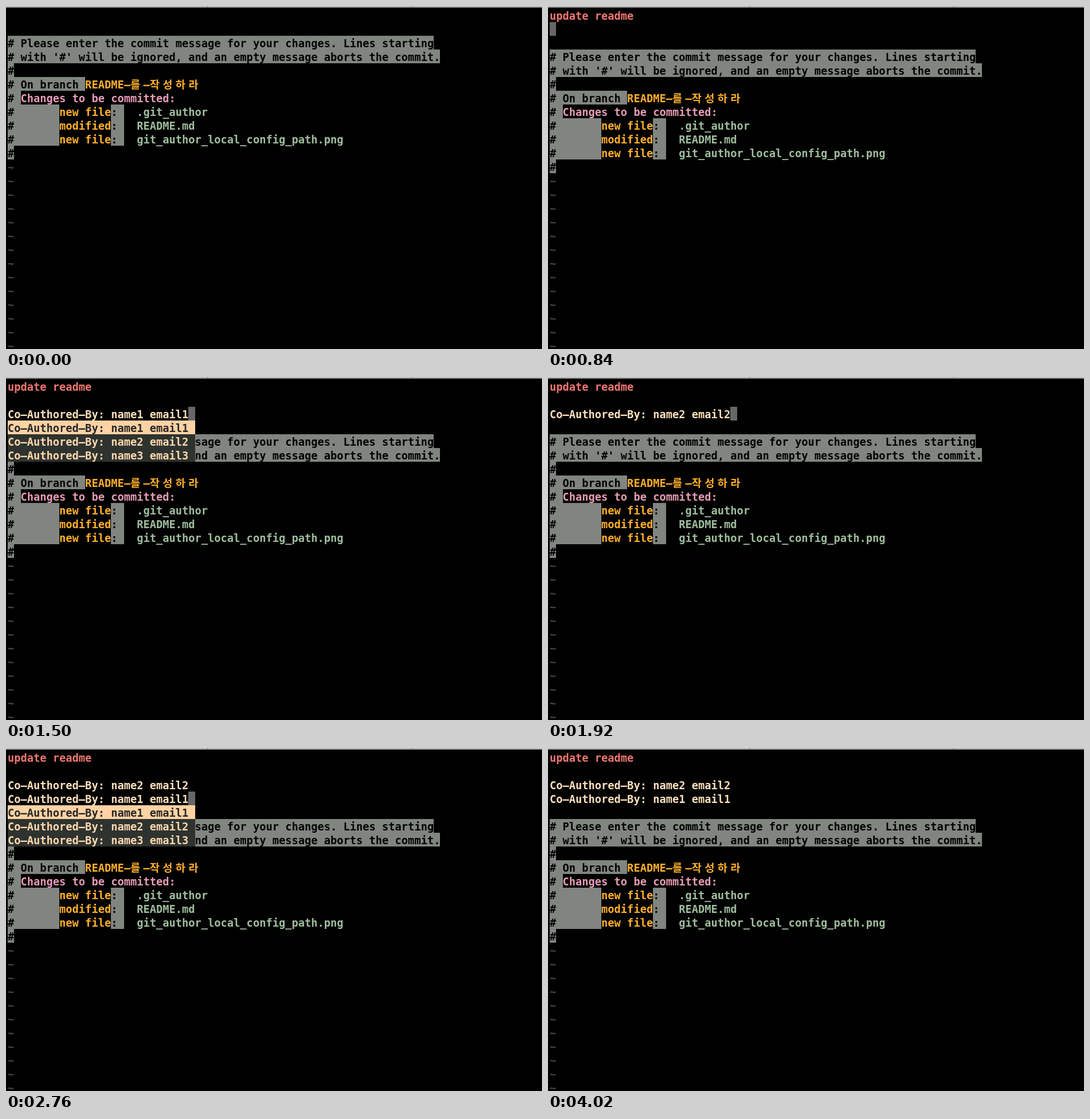
Animation of 935x599 px, one loop 4.08 s. Source, as an HTML page with a canvas:

```html
<!DOCTYPE html>
<html lang="en">
<head>
<meta charset="utf-8">
<title>Commit message editor</title>
<style>
html, body { margin: 0; width: 100%; height: 100%; overflow: hidden; background: #000; }
canvas { display: block; width: 935px; height: 599px; }
</style>
</head>
<body>
<canvas id="screen" width="935" height="599"></canvas>
<script>
const ctx = document.getElementById('screen').getContext('2d');
const LOOP = 4080, LEFT = 3, TOP = 4, CELL = 11.26, ROW = 24, ROWS = 25;
const FONT = 'bold 18.7px "DejaVu Sans Mono", "Noto Sans CJK KR", "Noto Sans CJK", monospace';
const C = {
  gray: '#808580', black: '#000', red: '#f0776f', cream: '#fbdfbc', yellow: '#ffaf2a',
  pink: '#e79bb8', green: '#9fbd9d', tilde: '#464a47', cursor: '#676767',
  menu: '#2e332f', menuText: '#ffd8ae', pick: '#ffd2a4', pickText: '#262626'
};

const TITLE = 'update readme';
const author = n => `Co–Authored–By: name${n} email${n}`;

// Each span: [column, text, color, background]
const note = text => [[0, text, C.black, C.gray]];
const file = (kind, name) => [
  [0, '#       ', C.black, C.gray], [8, kind, C.yellow],
  [16, ': ', C.black, C.gray], [20, name, C.green]
];
const COMMENTS = [
  note('# Please enter the commit message for your changes. Lines starting'),
  note("# with '#' will be ignored, and an empty message aborts the commit."),
  note('#'),
  [[0, '# On branch ', C.black, C.gray], [12, 'README–를–작성하라', C.yellow]],
  [[0, '# ', C.black, C.gray], [2, 'Changes to be committed:', C.pink]],
  file('new file', '.git_author'),
  file('modified', 'README.md'),
  file('new file', 'git_author_local_config_path.png'),
  note('#')
];

const isWide = ch => ch >= '가' && ch <= '힣';

function fillCells(row, col, count, color) {
  const x = Math.round(LEFT + col * CELL);
  ctx.fillStyle = color;
  ctx.fillRect(x, TOP + row * ROW, Math.round(LEFT + (col + count) * CELL) - x, ROW);
}

function drawText(row, [col, text, color, background]) {
  if (background) fillCells(row, col, text.length, background);
  ctx.fillStyle = color;
  for (const ch of text) {
    ctx.fillText(ch, LEFT + col * CELL, TOP + row * ROW + 20);
    col += isWide(ch) ? 2 : 1;
  }
}

function drawMenu(row, picked) {
  for (let n = 1; n <= 3; n++) {
    const colors = n === picked ? [C.pickText, C.pick] : [C.menuText, C.menu];
    drawText(row + n, [0, author(n) + ' ', ...colors]);
  }
}

// Message lines, cursor visibility and completion choice at time t
function stateAt(t) {
  if (t < 60) return { lines: [''], cursor: false };
  if (t < 840) {
    const step = Math.floor(t / 60);
    return { lines: [TITLE.slice(0, Math.min(13, Math.floor(step * 4 / 3)))], cursor: true };
  }
  if (t < 900) return { lines: [TITLE, ''], cursor: true };

  const lines = [TITLE, ''];
  if (t < 1200) return { lines: [...lines, ''], cursor: t < 1140 };
  if (t < 1320) return { lines: [...lines, t < 1260 ? 'C' : 'Co'], cursor: true };
  if (t < 2100) {
    const n = t < 1560 ? 1 : 2;
    return { lines: [...lines, author(n)], cursor: true, picked: t < 1860 ? n : 0 };
  }

  lines.push(author(2));
  if (t < 2280) return { lines: [...lines, 'Co'.slice(0, Math.floor((t - 2100) / 60))], cursor: true };
  return {
    lines: [...lines, author(1)],
    cursor: t < 3120 || (t >= 3600 && t < 4020),
    picked: t < 2880 ? 1 : 0
  };
}

function drawTopEdge() {
  ctx.fillStyle = '#b9bab9';
  ctx.fillRect(0, 0, 935, 2);
  ctx.fillStyle = '#737473';
  ctx.fillRect(0, 2, 935, 1);
  for (const x of [351, 707]) ctx.fillRect(x, 0, 1, 2);
}

function draw(t) {
  const { lines, cursor, picked } = stateAt(t);
  const last = lines.length - 1;
  const start = lines.length + 1;
  ctx.fillStyle = C.black;
  ctx.fillRect(0, 0, 935, 599);
  ctx.font = FONT;
  drawTopEdge();
  lines.forEach((text, row) => drawText(row, [0, text, row ? C.cream : C.red]));
  COMMENTS.forEach((spans, i) => spans.forEach(span => drawText(start + i, span)));
  for (let row = start + COMMENTS.length; row < ROWS; row++) drawText(row, [0, '~', C.tilde]);
  if (picked) drawMenu(last, picked);
  if (cursor) fillCells(last, lines[last].length, 1, C.cursor);
}

const origin = performance.now();
function tick() {
  draw((performance.now() - origin) % LOOP);
  requestAnimationFrame(tick);
}
tick();
</script>
</body>
</html>
```
